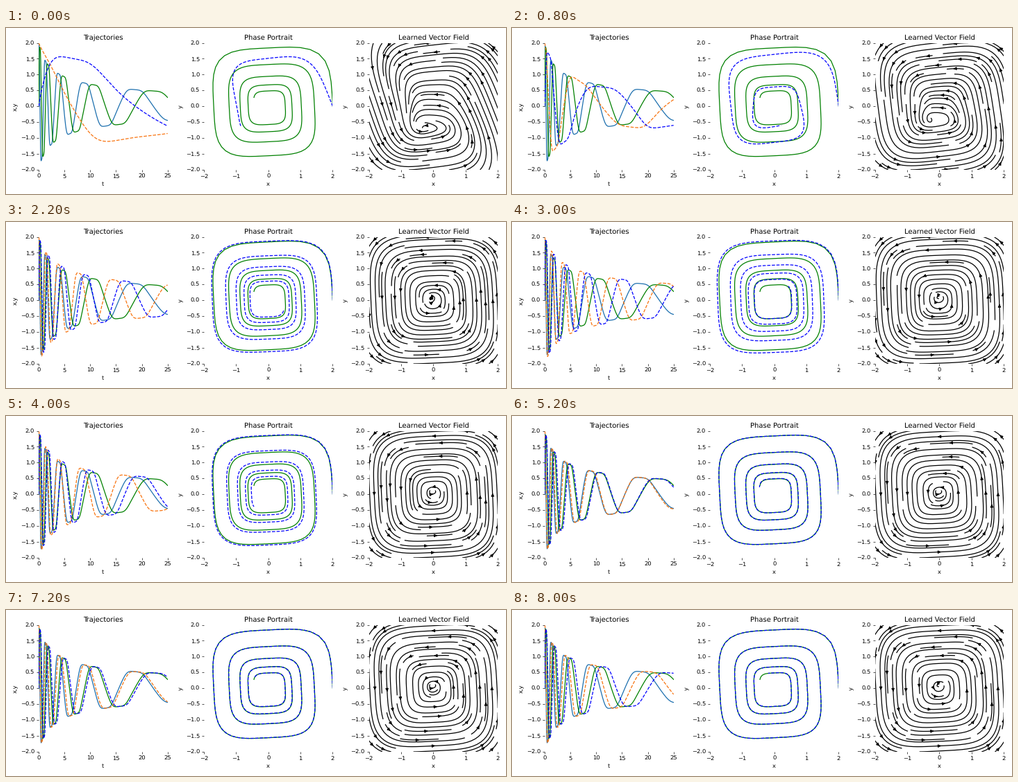
A matplotlib script that plays this animation: 720 by 240 pixels, repeating every 8200 ms.

```python
import numpy as np
import matplotlib.pyplot as plt
from matplotlib.animation import FuncAnimation

FRAMES, STEP_MS, SUBSTEPS = 41, 200, 3
START = (2.0, 0.0)
BLUE, ORANGE = "#1c6fae", "#f8730f"
t = np.linspace(0, 25, 1000)

plt.rcParams.update({"text.hinting": "none", "xtick.major.pad": 3.1})


def true_field(x, y):
    return -0.1 * x**3 - 2 * y**3, 2 * x**3 - 0.1 * y**3


def learned_field(x, y, step):
    """Training blends a weak, off-centre field into the true rotation."""
    fit = 1 - np.exp(-(step / 6.3) ** 2)
    ring = np.exp(-step / 6) * np.cos(np.pi * step / 18)
    drift = 0.11 * fit * np.cos(2 * np.pi * (step - 31) / 22)
    damp = 0.1 + 0.3 * ring

    def blend(first, last):
        return first + (last - first) * fit

    u = x**3 - blend(-0.3, -0.06) ** 3
    v = y**3 - blend(-0.65, 0.1) ** 3
    h = x**4 + y**4
    # The outer loops run slow; the pace of the inner ones wobbles
    speed = 1 / (1 + 0.015 * fit * h) + drift / (1 + 2 * h)
    dx = blend(-0.047, -damp) * u + blend(-0.075, -2) * v
    dy = blend(0.13, 2) * u + blend(-0.009, -damp) * v
    return speed * dx, speed * dy


def integrate(field, n):
    """RK4 for n independent trajectories at once."""
    def f(s):
        return np.array(field(s[0], s[1]))

    state = np.array([np.full(n, c) for c in START])
    h = (t[1] - t[0]) / SUBSTEPS
    path = [state]
    for _ in t[1:]:
        for _ in range(SUBSTEPS):
            k1 = f(state)
            k2 = f(state + h / 2 * k1)
            k3 = f(state + h / 2 * k2)
            k4 = f(state + h * k3)
            state = state + h / 6 * (k1 + 2 * k2 + 2 * k3 + k4)
        path.append(state)
    return np.array(path)


true_x, true_y = integrate(true_field, 1)[:, :, 0].T
steps = np.arange(FRAMES)
pred = integrate(lambda x, y: learned_field(x, y, steps), FRAMES)

fig = plt.figure(figsize=(12, 4), dpi=60, facecolor="white")
fig.subplots_adjust(left=47 / 720, right=708.3 / 720, bottom=35 / 240,
                    top=218.5 / 240, wspace=0.281)


def panel(pos, title, xlabel, ylabel, xlim):
    ax = fig.add_subplot(1, 3, pos, frameon=False)
    ax.set(title=title, xlabel=xlabel, ylabel=ylabel, xlim=xlim, ylim=(-2, 2))
    return ax


ax_traj = panel(1, "Trajectories", "t", "x,y", (0, 25))
ax_phase = panel(2, "Phase Portrait", "x", "y", (-2, 2))
ax_field = panel(3, "Learned Vector Field", "x", "y", (-2, 2))

ax_traj.plot(t, true_x, color=BLUE)
ax_traj.plot(t, true_y, "g-")
line_x, = ax_traj.plot(t, true_x, "--", color=ORANGE)
line_y, = ax_traj.plot(t, true_y, "b--")
ax_phase.plot(true_x, true_y, "g-")
line_phase, = ax_phase.plot([], [], "b--")

grid_y, grid_x = np.mgrid[-2:2:21j, -2:2:21j]


def draw_streams(step):
    for artist in list(ax_field.collections) + list(ax_field.patches):
        artist.remove()
    dx, dy = learned_field(grid_x, grid_y, step)
    mag = np.hypot(dx, dy) + 1e-12
    ax_field.streamplot(grid_x, grid_y, dx / mag, dy / mag, color="black")
    ax_field.set(xlim=(-2, 2), ylim=(-2, 2))


def update(step):
    x, y = pred[:, 0, step], pred[:, 1, step]
    line_x.set_ydata(x)
    line_y.set_ydata(y)
    line_phase.set_data(x, y)
    draw_streams(step)
    return line_x, line_y, line_phase


anim = FuncAnimation(fig, update, frames=FRAMES, interval=STEP_MS,
                     init_func=lambda: [], repeat=True, repeat_delay=0,
                     cache_frame_data=False)
plt.show()
```
